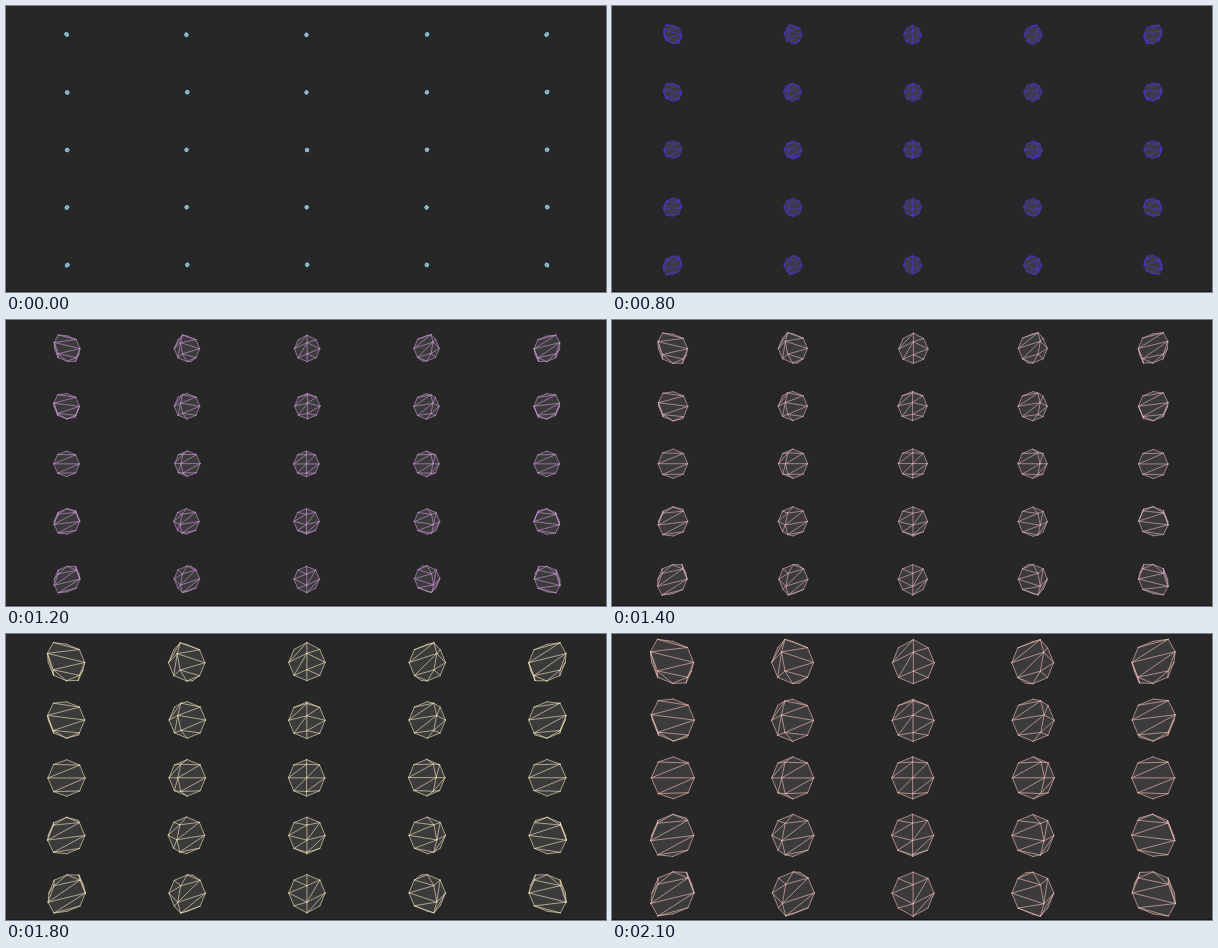
Write an HTML page with a canvas that moves like this. It is 600x286 px and loops after 2200 ms.

```html
<!DOCTYPE html>
<html lang="en">
<head>
<meta charset="utf-8">
<title>Growing spheres</title>
<style>
  html, body { margin: 0; width: 100%; height: 100%; overflow: hidden; background: #272727; }
  canvas { display: block; }
</style>
</head>
<body>
<canvas id="stage" width="600" height="286"></canvas>
<script>
const ctx = document.getElementById("stage").getContext("2d");
const STEP = 100, STEPS = 22;
const CENTER = { x: 300.9, y: 143.8 }, GAP = { x: 120, y: 57.6 };
const FOCAL = 249; // 60 degree vertical field of view
const DETAIL = 4;

// Stroke colours: [step, r, g, b]
const COLORS = [
  [0, 150, 202, 225], [4, 222, 142, 214], [8, 76, 52, 225], [12, 205, 152, 216],
  [16, 245, 200, 188], [18, 240, 230, 190], [21, 243, 192, 188]
];

function strokeColor(step) {
  const i = Math.max(1, COLORS.findIndex(c => c[0] >= step));
  const a = COLORS[i - 1], b = COLORS[i];
  const k = (step - a[0]) / (b[0] - a[0]);
  return `rgb(${[1, 2, 3].map(j => Math.round(a[j] + (b[j] - a[j]) * k))})`;
}

function seededRandom(seed) {
  return () => {
    seed = (seed * 1664525 + 1013904223) >>> 0;
    return seed / 4294967296;
  };
}

// Unit sphere: rings from top to bottom, meridians from the front to the right
const points = [], faces = [];
const vertex = (i, j) => i * DETAIL + (i % DETAIL ? j % DETAIL : 0);
for (let i = 0; i <= DETAIL; i++) {
  const phi = Math.PI * (i / DETAIL - 0.5);
  for (let j = 0; j < DETAIL; j++) {
    const theta = 2 * Math.PI * j / DETAIL;
    points.push([Math.cos(phi) * Math.sin(theta), Math.sin(phi), Math.cos(phi) * Math.cos(theta)]);
    if (i === DETAIL) continue;
    const a = vertex(i, j), b = vertex(i, j + 1);
    const c = vertex(i + 1, j + 1), d = vertex(i + 1, j);
    faces.push([a, b, d], [d, b, c]);
  }
}

function drawSphere(x, y, r) {
  const flat = points.map(([px, py, pz]) => {
    const k = FOCAL / (FOCAL - pz * r);
    return [CENTER.x + (x + px * r) * k, CENTER.y + (y + py * r) * k];
  });
  const body = new Path2D(), wires = new Path2D();
  const drawn = new Set();
  for (const face of faces) {
    const [a, b, c] = face.map(n => flat[n]);
    const area = (b[0] - a[0]) * (c[1] - a[1]) - (b[1] - a[1]) * (c[0] - a[0]);
    if (area < 1e-4) continue; // faces away
    body.moveTo(...a);
    body.lineTo(...b);
    body.lineTo(...c);
    face.forEach((from, n) => {
      const to = face[(n + 1) % 3];
      const key = Math.min(from, to) * points.length + Math.max(from, to);
      if (drawn.has(key)) return;
      drawn.add(key);
      wires.moveTo(...flat[from]);
      wires.lineTo(...flat[to]);
    });
  }
  ctx.fill(body);
  ctx.stroke(wires);
}

function draw(step) {
  const random = seededRandom(977 * step + 31);
  const jitter = () => random() - 0.5;
  const r = 1.7 + 0.92 * step;
  ctx.fillStyle = "#272727";
  ctx.fillRect(0, 0, 600, 286);
  ctx.fillStyle = "#1d1517";
  ctx.fillRect(0, 285, 600, 1);
  ctx.fillStyle = "#3b3b3b";
  ctx.strokeStyle = strokeColor(step);
  ctx.lineWidth = 0.62;
  ctx.lineCap = "round";
  for (let row = -2; row <= 2; row++) {
    for (let col = -2; col <= 2; col++) {
      drawSphere(col * GAP.x + jitter(), row * GAP.y + jitter() / 2, r);
    }
  }
}

const start = performance.now();
function tick() {
  draw(Math.floor((performance.now() - start) / STEP) % STEPS);
  requestAnimationFrame(tick);
}
tick();
</script>
</body>
</html>
```
